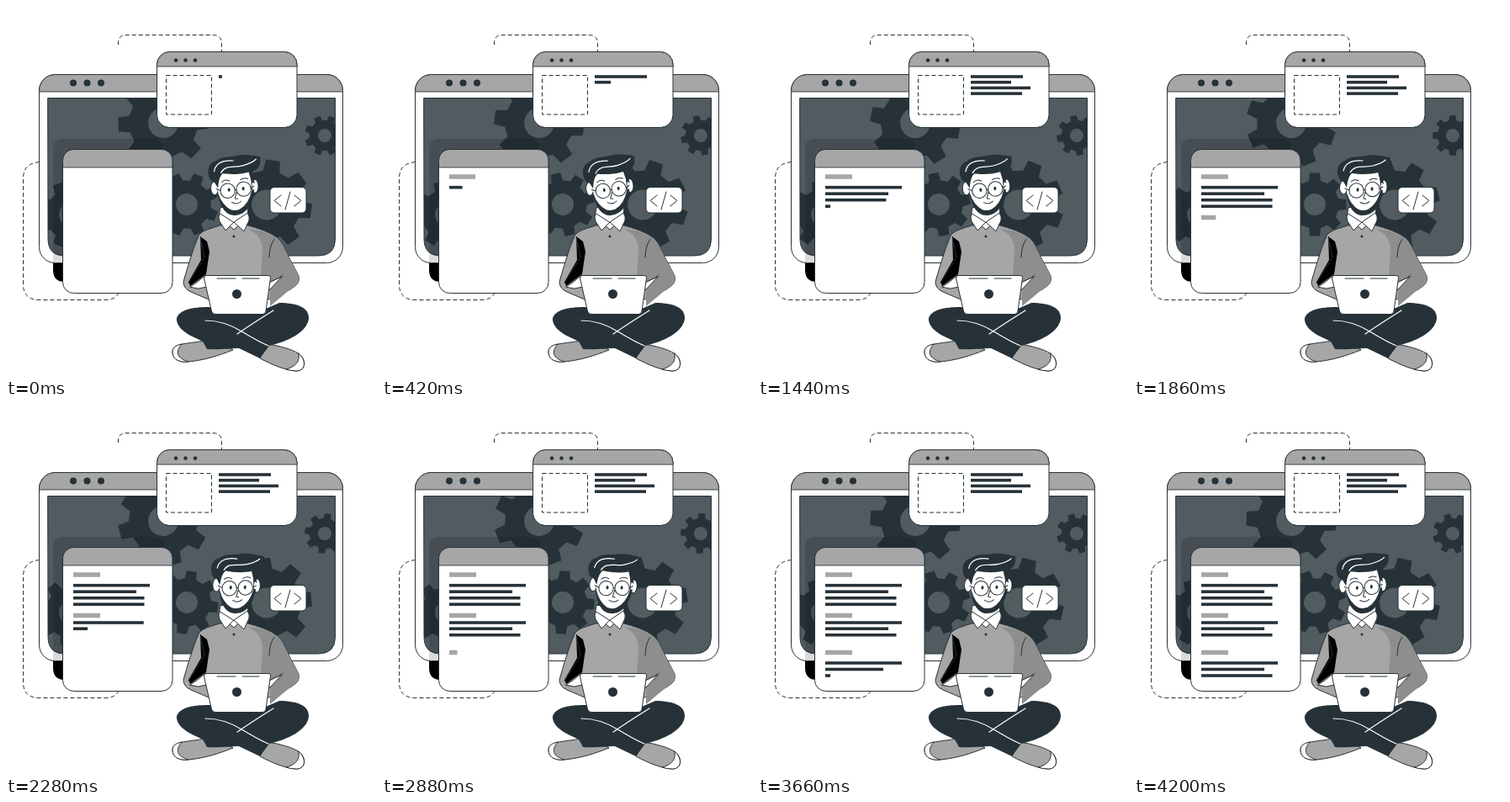
An HTML page for the animation above (4260 ms loop, 440 by 440 pixels).

```html
<!DOCTYPE html>
<html lang="en">
<head>
<meta charset="utf-8">
<title>Developer at work</title>
<style>
html, body { margin: 0; width: 100%; height: 100%; overflow: hidden; background: #fff; }
svg { display: block; width: 100vw; height: 100vh; }
.ink { fill: #263238; }
.gray { fill: #a6a6a6; }
.shade { fill: #8e8e8e; }
.paper { fill: #fff; }
.line { stroke: #263238; stroke-width: 1; stroke-linejoin: round; stroke-linecap: round; }
.open { fill: none; }
.dash { fill: none; stroke: #263238; stroke-width: 1; stroke-dasharray: 5 3; }
.chalk { fill: none; stroke: #fff; stroke-width: 1.2; stroke-linecap: round; }
</style>
</head>
<body>
<svg viewBox="0 0 440 440">
  <defs>
    <clipPath id="screenClip"><path d="M50 109.5H391.5V277Q391.5 297 371.5 297H70Q50 297 50 277Z"/></clipPath>
  </defs>

  <path class="dash" d="M133.5 46V44Q133.5 34.5 143 34.5H246Q256.5 34.5 256.5 45V54"/>
  <path class="dash" d="M40 185.5Q20.5 187 20.5 205V331Q20.5 349.5 40 349.5H119Q130 349 133.5 342"/>

  <path d="M56 300H76V328H70Q56 328 56 314Z"/>

  <!-- monitor -->
  <rect class="paper line" x="39.5" y="81.500" width="361" height="224" rx="19"/>
  <path class="gray line" d="M39.5 101.5V100.5A19 19 0 0 1 58.5 81.5H381.5A19 19 0 0 1 400.5 100.5V101.5Z"/>
  <g class="ink"><circle cx="80" cy="91.5" r="4"/><circle cx="96.5" cy="91.5" r="4"/><circle cx="113" cy="91.5" r="4"/></g>
  <g clip-path="url(#screenClip)">
    <rect x="49" y="109" width="344" height="189" fill="#515b60"/>
    <g id="gears"></g>
  </g>
  <path class="line open" d="M50 109.5H391.5V277Q391.5 297 371.5 297H70Q50 297 50 277Z"/>
  <path d="M56 305V170Q56 158 68 158H175Q187 158 187 170V305Z" opacity=".14"/>

  <!-- document window -->
  <rect class="paper line" x="67.5" y="170.5" width="130.5" height="171" rx="13"/>
  <path class="gray line" d="M67.5 191.5V183.5A13 13 0 0 1 80.5 170.5H185A13 13 0 0 1 198 183.5V191.5Z"/>

  <!-- upper window -->
  <rect class="paper line" x="179.5" y="54.5" width="166.5" height="90" rx="15"/>
  <path class="gray line" d="M179.5 71.5V69.5A15 15 0 0 1 194.5 54.5H331A15 15 0 0 1 346 69.5V71.5Z"/>
  <g class="ink"><circle cx="202" cy="64.5" r="2.3"/><circle cx="213.5" cy="64.5" r="2.3"/><circle cx="225" cy="64.5" r="2.3"/></g>
  <rect class="dash" x="190.5" y="82.5" width="54" height="46.5"/>
  <g id="bars"></g>

  <!-- code card -->
  <rect class="paper line" x="314" y="215.5" width="43" height="30.5" rx="5"/>
  <path class="line open" d="M327 225L319 231.500L327 238M338 221L332 242M343 225L351 231.500L343 238"/>

  <!-- legs and shoes -->
  <path class="gray line" d="M236 398C218 402 199 400 198 411C198 421 207 424 217 423C237 421 252 416 270 409L252 399Z"/>
  <path class="paper line" d="M209 402Q198 404 198 411C198 421 207 424 217 423C203 419 201 411 209 402Z"/>
  <path class="gray line" d="M309 402L302 419C315 426 334 434 346 434C356 433 357 423 351 416C344 409 330 406 322 404Z"/>
  <path class="paper line" d="M348 413C357 421 357 433 346 434Q339 434 333 432C344 429 350 423 348 413Z"/>
  <path class="ink" d="M240 358C222 358 207 361 203 371C202 381 213 390 228 396L234 399L239 408C255 409 268 407 277 407L302 419L313 404C335 399 358 388 360 372C361 359 347 353 325 353L309 360Z"/>
  <path class="chalk" d="M237 374C255 374 268 379 282 388C292 394 302 400 312 404M318 362C302 372 288 381 275 390"/>

  <!-- torso and arms -->
  <path class="gray line" d="M254 261C242 265 233 267 229 273C222 290 216 310 211 328Q211 336 220 340L241 349H312L338 337Q351 330 348 321L331 288C325 273 312 268 288 261Z"/>
  <path class="shade" d="M289 266Q304 272 305 290L303 322H314V357L338 337Q351 330 348 321L331 288C325 273 312 268 289 265Z"/>
  <path d="M231 274L239 280L242 292L238 319L219 333L217 328L232 302Z"/>
  <path class="paper line" d="M219 334Q229 328 237 320L239 334L229 336Z"/>
  <path class="line open" d="M231 275L236 299L217 329M319 277Q313 286 313 299M329 321L315 328"/>
  <path class="paper line" d="M313 329Q321 325 328 322L313 338Z"/>
  <path class="paper line" d="M255 240L253 250L271 266L288 250L287 238Z"/>
  <path class="paper line" d="M254 247Q252 251 254 256L261 267L271 257L283 268L289 255Q290 250 287 246L271 257Z"/>
  <circle class="ink" cx="271" cy="274" r="1.5"/>

  <g id="head">
    <ellipse class="paper line" cx="249" cy="216" rx="4.5" ry="8"/>
    <ellipse class="paper line" cx="297" cy="215" rx="4" ry="8"/>
    <path class="ink" d="M252 220C254 236 260 249 272 249C285 249 293 238 296 219Z"/>
    <path class="paper" d="M252 195L253 222Q257 236 267 242Q272 244 278 242Q289 236 293 220L292 192Z"/>
    <path class="ink" d="M245 207C239 198 242 186 251 184C257 178 268 180 276 178C286 176 297 179 304 180C306 189 301 196 294 198L297 212L293 209L290 198C279 201 267 200 259 199C255 203 254 208 253 216L249 209Z"/>
    <path class="chalk" d="M249 196C251 186 260 183 272 184M257 198C263 188 272 193 284 190Q295 187 299 183"/>
    <path class="line open" d="M258 209Q262 205 267 208M280 207Q284 204 289 206" stroke-width="2"/>
    <g class="line open">
      <circle cx="264.5" cy="219.5" r="8.7"/><circle cx="283.5" cy="218" r="8.7"/>
      <path d="M273 218.5H275M256 219L251 217M292 217L296 215M275 221L273 229L276 229.5M269 233.5Q275 237 280 232.500"/>
    </g>
    <g class="ink"><ellipse cx="266" cy="218.5" rx="1.5" ry="2.2"/><ellipse cx="283" cy="217.5" rx="1.5" ry="2.2"/></g>
  </g>

  <!-- laptop -->
  <path class="paper line" d="M238 320.5H312Q315 320.5 314.5 323.5L309 363Q308.5 366.5 305 366.5H249Q245.5 366.5 244.5 363L235.5 324Q235 320.5 238 320.5Z"/>
  <path class="line open" d="M251 324H273M281 324H301"/>
  <circle class="ink" cx="274.5" cy="342.5" r="5.5"/>
</svg>
<script>
const LOOP = 4260, STEP = 60;
const byId = id => document.getElementById(id);

function add(parent, tag, attrs) {
  const node = document.createElementNS("http://www.w3.org/2000/svg", tag);
  for (const key in attrs) node.setAttribute(key, attrs[key]);
  return parent.appendChild(node);
}

function gearPath(radius) {
  const corners = [];
  for (let tooth = 0; tooth < 8; tooth++) {
    for (const [deg, scale] of [[-14, .76], [-9, 1], [9, 1], [14, .76]]) {
      const angle = (tooth * 45 + deg) * Math.PI / 180;
      corners.push([Math.cos(angle), Math.sin(angle)].map(v => (v * radius * scale).toFixed(2)));
    }
  }
  return "M" + corners.join("L") + "Z";
}

// x, y, outer radius, hole radius, starting angle
const gears = [
  [187, 139, 54, 18, -2], [215, 236, 38, 13, 22], [310, 236.5, 54, 18, 8],
  [379, 154, 24, 8, 22], [77, 248, 40, 14, 22]
].map(([x, y, radius, hole, phase]) => {
  const node = add(byId("gears"), "g");
  add(node, "path", { d: gearPath(radius), class: "ink" });
  add(node, "circle", { r: hole, fill: "#515b60" });
  return { node, x, y, phase };
});

const bars = [];
function addBar(x, y, width, start, duration, title) {
  const height = title ? 5.5 : 3.6;
  const node = add(byId("bars"), "rect", { x, y: y - height / 2, height, class: title ? "gray" : "ink" });
  bars.push({ node, width, start, duration });
}

[62, 48, 71, 61].forEach((width, i) => addBar(253, 84 + i * 6.7, width, -20 + i * 315, 315));

// y, width, start; narrow ones are headings
[
  [203, 32, 80], [215.7, 91, 360], [223.2, 75, 655], [230.7, 84.5, 1140], [238.2, 84.5, 1415],
  [251.5, 32, 1670], [260, 91, 1958], [267.2, 75, 2200], [274.7, 84.5, 2480],
  [295.5, 32, 2775], [308, 91, 3050], [315.5, 75, 3338], [323, 84.5, 3635]
].forEach(([y, width, start]) => addBar(80, y, width, start, 350, width === 32));

function render(time) {
  const t = Math.floor(time % LOOP / STEP) * STEP;
  for (const { node, x, y, phase } of gears) {
    node.setAttribute("transform", `translate(${x} ${y}) rotate(${phase - t / LOOP * 360})`);
  }
  for (const { node, width, start, duration } of bars) {
    const progress = Math.min(1, Math.max(0, (t - start) / duration));
    node.setAttribute("width", width * progress);
  }
  const tilt = -4 * Math.cos((t - 780) / LOOP * 2 * Math.PI);
  byId("head").setAttribute("transform", `rotate(${tilt} 271 248)`);
}

const origin = performance.now();
function tick() {
  render(performance.now() - origin);
  requestAnimationFrame(tick);
}
tick();
</script>
</body>
</html>
```
